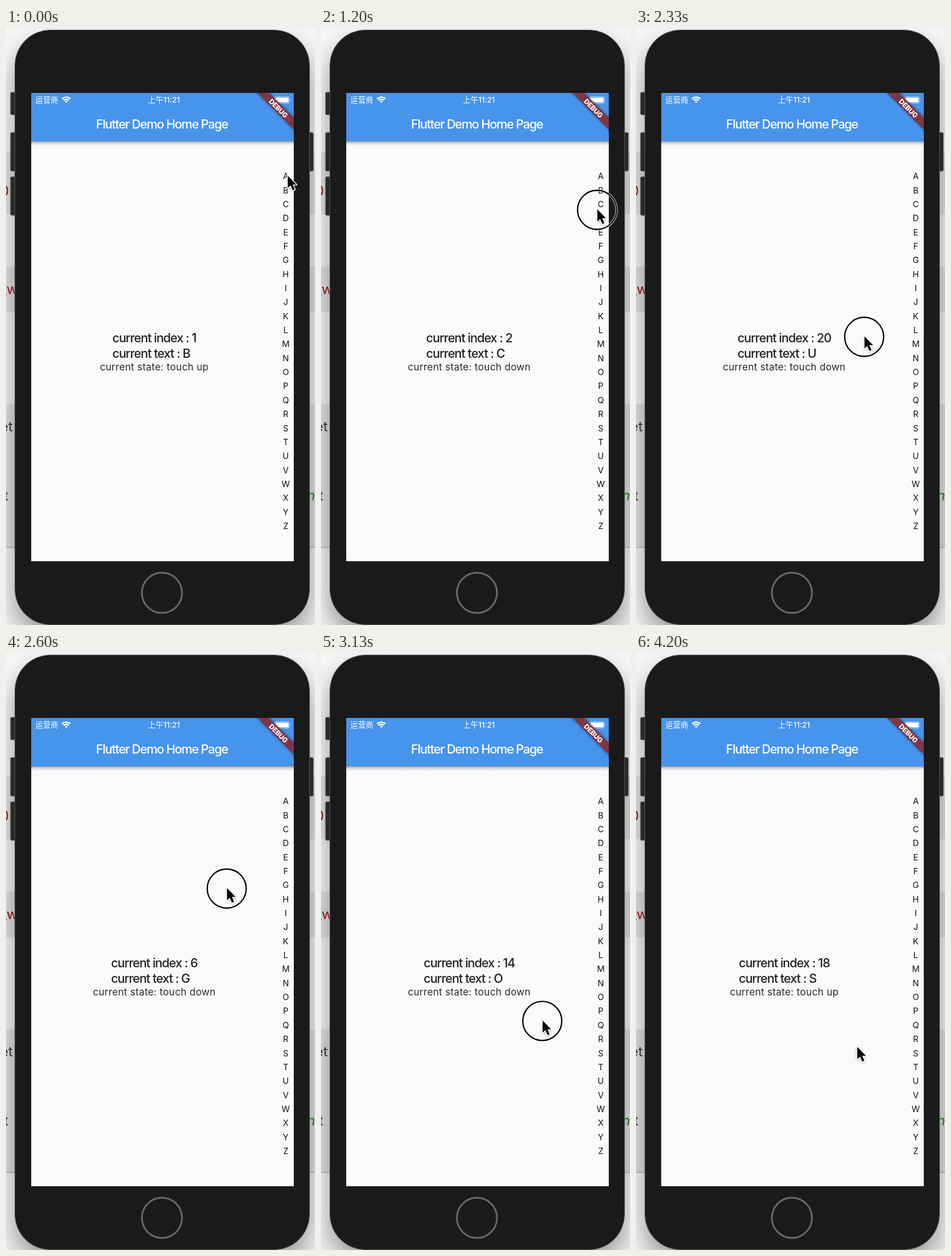
Recreate the animation shown at these times as an HTML page. Size 539 by 1039 pixels, loop 4940 ms.

```html
<!DOCTYPE html>
<html lang="en">
<head>
<meta charset="utf-8">
<title>Letter index demo</title>
<style>
  html, body { margin: 0; width: 100%; height: 100%; overflow: hidden; background: #f7f7f7; }
  svg { display: block; width: 539px; height: 1039px; }
  text { font-family: Inter, "Noto Sans CJK SC", "Noto Sans CJK", sans-serif; white-space: pre; }
  .mid { text-anchor: middle; }
  .code { font: 24px "Noto Sans Mono", "DejaVu Sans Mono", monospace; }
  .status { font-size: 13.4px; fill: #fff; }
  .title { font-size: 21.5px; font-weight: 500; letter-spacing: -1.2px; fill: #fff; }
  .headline { font-size: 21.5px; font-weight: 500; letter-spacing: -1px; fill: #212121; }
  .state { font-size: 17.1px; letter-spacing: .27px; fill: #2b2b2b; }
  .letters { font-size: 14.6px; fill: #111; }
</style>
</head>
<body>
<svg viewBox="0 0 539 1039">
  <defs>
    <filter id="phoneShadow" x="-30%" y="-20%" width="160%" height="140%">
      <feGaussianBlur stdDeviation="24"/>
    </filter>
    <filter id="soft" x="-50%" y="-50%" width="200%" height="200%">
      <feGaussianBlur stdDeviation="2.5"/>
    </filter>
    <linearGradient id="barShadow" x2="0" y2="1">
      <stop offset="0" stop-opacity=".42"/>
      <stop offset=".35" stop-opacity=".17"/>
      <stop offset="1" stop-opacity="0"/>
    </linearGradient>
    <clipPath id="screen"><rect x="44" y="113" width="458" height="815"/></clipPath>
  </defs>

  <!-- editor behind the phone -->
  <rect width="539" height="1039" fill="#f7f7f7"/>
  <g fill="#e4e4e4">
    <rect y="215" width="539" height="109"/>
    <rect y="415" width="539" height="80"/>
    <rect y="655" width="539" height="249"/>
  </g>
  <path d="M0 904H539" stroke="#b5b5b5" stroke-width="1.5"/>
  <rect x="15" y="28" width="515" height="1035" rx="62" opacity=".4" filter="url(#phoneShadow)"/>
  <g class="code">
    <text x="-10" y="292" fill="#8c1010">0</text>
    <text x="-10" y="463" fill="#8c1010">_w</text>
    <text x="-10" y="702" fill="#333">et</text>
    <text x="-10" y="762" fill="#1010e0">t</text>
    <text x="-10" y="822" fill="#333">lt</text>
    <text x="525" y="822" fill="#107010" font-style="italic">nc</text>
  </g>

  <!-- phone -->
  <g fill="#292929" stroke="#444" stroke-width=".8">
    <rect x="8" y="112" width="12" height="39" rx="2"/>
    <rect x="8" y="182" width="12" height="67" rx="2"/>
    <rect x="8" y="259" width="12" height="67" rx="2"/>
    <rect x="524" y="182" width="12" height="67" rx="2"/>
  </g>
  <rect x="15.5" y="3.5" width="514" height="1035" rx="62" fill="#1a1a1a" stroke="#555"/>
  <circle cx="272" cy="983" r="35" fill="none" stroke="#6a6a6a" stroke-width="3"/>

  <!-- app -->
  <g clip-path="url(#screen)">
    <rect x="44" y="113" width="458" height="815" fill="#fafafa"/>
    <rect x="44" y="197" width="458" height="8" fill="url(#barShadow)"/>
    <rect x="44" y="113" width="458" height="84" fill="#4694ec"/>
    <text class="status" x="51" y="130" font-weight="300">运营商</text>
    <g transform="translate(105 130)" fill="none" stroke="#fff" stroke-width="2.3">
      <path d="M-7.2 -6.6A10.3 10.3 0 0 1 7.2 -6.6M-4.6 -3.9A6.6 6.6 0 0 1 4.6 -3.9"/>
      <path d="M0 .6L-2.3 -1.8A3.3 3.3 0 0 1 2.3 -1.8Z" fill="#fff" stroke="none"/>
    </g>
    <text class="status mid" x="275.5" y="130" font-weight="500">上午11:21</text>
    <rect x="468.5" y="119.5" width="26" height="11.5" rx="2.5" fill="none" stroke="#fff" stroke-opacity=".6"/>
    <rect x="470" y="121" width="23" height="8.5" rx="1.2" fill="#fff"/>
    <path d="M496 123.3v4q1.6-2 0-4" fill="#fff" fill-opacity=".6"/>
    <text class="title mid" x="272" y="175">Flutter Demo Home Page</text>
    <g transform="translate(502 113) rotate(45)">
      <rect x="-50" y="30.5" width="100" height="14.5" opacity=".45" filter="url(#soft)"/>
      <rect x="-50" y="30.5" width="100" height="14.5" fill="#7d3747"/>
      <text class="mid" y="42.3" font-size="12" font-weight="800" fill="#fff" letter-spacing="-.2">DEBUG</text>
    </g>
    <text id="index" class="headline" y="547"></text>
    <text id="letter" class="headline" y="573.7"></text>
    <text id="state" class="state mid" x="258.6" y="596"></text>
    <g id="letters" class="letters mid"></g>
  </g>

  <!-- pointer -->
  <g id="pointer">
    <g id="ring" fill="none">
      <circle r="34" stroke="#fff" stroke-width="4"/>
      <circle r="34" stroke="#000" stroke-width="2.3"/>
    </g>
    <g transform="translate(.5 -1)" stroke-linejoin="round">
      <path d="M0 2V24L5 19.5L9 28L13 26.5L9.5 18H16Z" opacity=".4" filter="url(#soft)"/>
      <path d="M0 0V21.3L4.8 16.9L8.6 25.6L12.3 24L8.6 15.5H15Z"
            stroke="#fff" stroke-width="3" paint-order="stroke"/>
    </g>
  </g>
</svg>
<script>
const LOOP = 4940, TOUCH_LAG = 100, FADE = 400;
const PRESS = 200, RELEASE = 3930, RING_GONE = 4200;
const FIRST_Y = 258, ROW = 24.35, CENTER = 258.6;
const ALPHABET = 'ABCDEFGHIJKLMNOPQRSTUVWXYZ';

// pointer path: [ms, x, y]
const PATH = [
  [0, 491, 258], [870, 491, 258], [1000, 489, 270], [1100, 485, 296],
  [1200, 481.5, 316.5], [1270, 472, 420], [1330, 458, 580], [1400, 441, 765],
  [1470, 431, 820], [1530, 424.5, 838.5], [1600, 421, 850], [1670, 420, 853],
  [1930, 420, 853], [2070, 419, 835], [2130, 417, 800], [2230, 410, 745],
  [2270, 406, 690], [2330, 398, 537.5], [2400, 392, 450], [2470, 388, 405],
  [2530, 386, 392], [2600, 385, 410], [2670, 384, 468], [2730, 384, 555],
  [2800, 385, 572], [2870, 385.5, 580], [3070, 386, 615], [3200, 386, 670],
  [3300, 385.5, 685], [3400, 385.5, 686.5], [LOOP, 385.5, 686.5]
];

const $ = id => document.getElementById(id);
const [indexLine, letterLine, stateLine, pointer, ring] =
  ['index', 'letter', 'state', 'pointer', 'ring'].map($);

$('letters').innerHTML = [...ALPHABET]
  .map((c, i) => `<text x="488" y="${FIRST_Y + 5.2 + i * ROW}">${c}</text>`).join('');

function positionAt(t) {
  const i = Math.max(1, PATH.findIndex(p => p[0] >= t));
  const [t0, x0, y0] = PATH[i - 1], [t1, x1, y1] = PATH[i];
  const f = (t - t0) / (t1 - t0);
  return [x0 + (x1 - x0) * f, y0 + (y1 - y0) * f];
}

function snap(t) {
  const rest = t % 200;
  return t - rest + (rest >= 130 ? 130 : rest >= 70 ? 70 : 0);
}

function selectedAt(t) {
  if (t < PRESS) return 1;
  return Math.round((positionAt(t - TOUCH_LAG)[1] - FIRST_Y) / ROW);
}

function draw(t) {
  const selected = selectedAt(t);
  const down = t >= PRESS && t < RELEASE;
  indexLine.textContent = `current index : ${selected}`;
  letterLine.textContent = `current text : ${ALPHABET[selected]}`;
  stateLine.textContent = `current state: touch ${down ? 'down' : 'up'}`;
  const left = CENTER - indexLine.getComputedTextLength() / 2;
  indexLine.setAttribute('x', left);
  letterLine.setAttribute('x', left);

  pointer.setAttribute('transform', `translate(${positionAt(t)})`);
  const strength = Math.min(t, RING_GONE - t) / FADE;
  ring.setAttribute('opacity', Math.max(0, Math.min(1, strength)));
}

function tick() {
  draw(snap(performance.now() % LOOP));
  requestAnimationFrame(tick);
}
tick();
</script>
</body>
</html>
```
